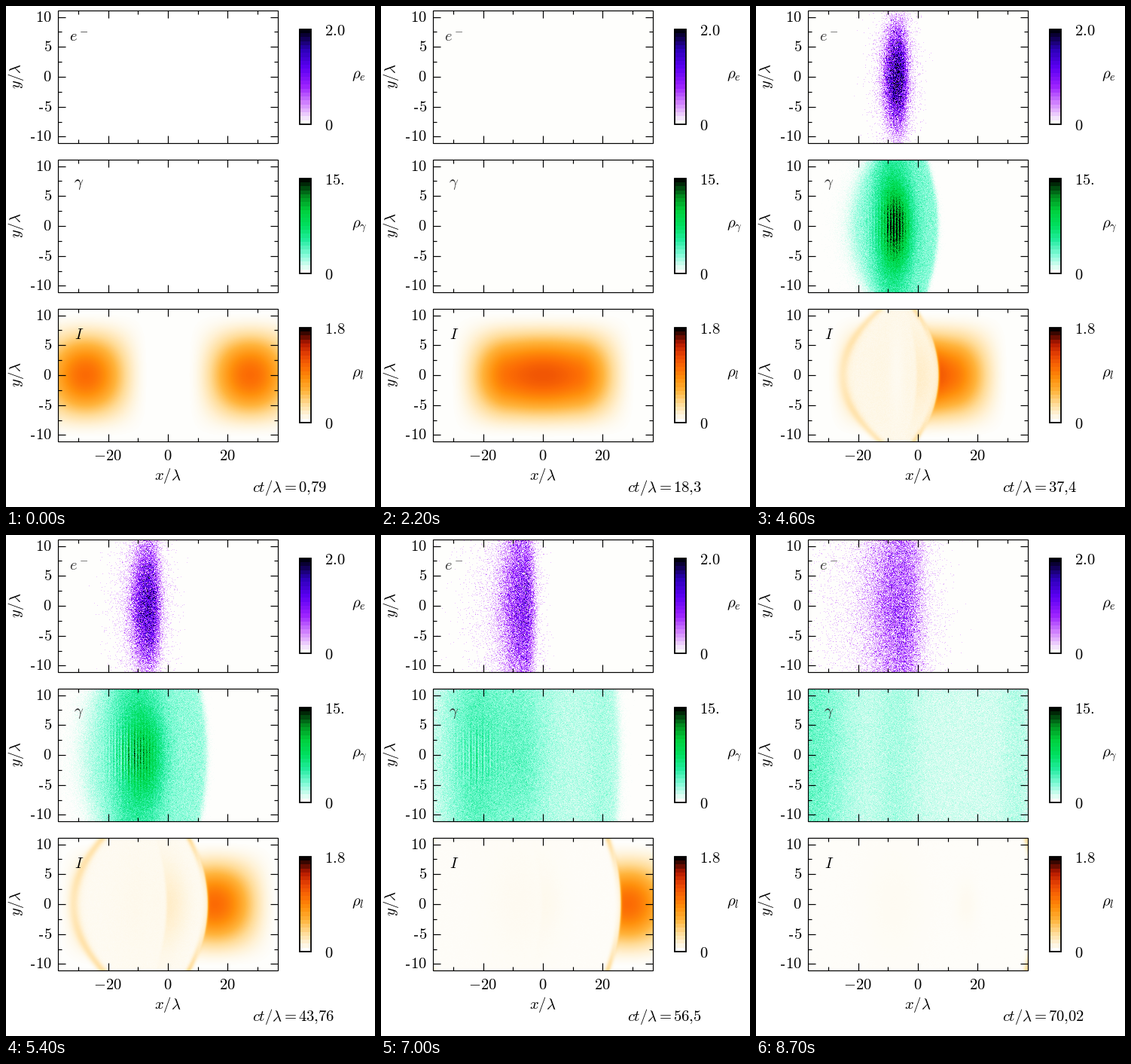
Recreate the animation shown at these times as a matplotlib script. Size 490 by 665 pixels, loop 8.8 s.

```python
import numpy as np
import matplotlib.pyplot as plt
from matplotlib.animation import FuncAnimation
from matplotlib.colors import LinearSegmentedColormap
from matplotlib.patches import Rectangle

W, H = 490, 665
FRAMES, STEP_MS = 88, 100
LEFT, RIGHT = 68.5, 360.5
TOPS = (5.5, 203.5, 401.5)
HEIGHT = 176
X0, XS = 214.6, 3.97      # pixel of x = 0, pixels per unit
YS = 7.94
PT = 0.72                 # points per pixel at 100 dpi
ONSET = 21.8              # time at which the cascade starts
BLANK = "#fefefc"
FADED = "#303030"

plt.rcParams["mathtext.fontset"] = "cm"


def ramp(name, *stops):
    return LinearSegmentedColormap.from_list(name, stops, N=256)


VIOLET = ramp("violet", (0, BLANK), (0.2, "#d488ff"), (0.4, "#9a20ff"),
              (0.6, "#5c00f4"), (0.8, "#2c00b8"), (1, "#000010"))
GREEN = ramp("green", (0, BLANK), (0.18, "#84fbd8"), (0.34, "#24eca0"),
             (0.5, "#00e060"), (0.67, "#00d03c"), (0.82, "#009020"), (1, "#000800"))
HEAT = ramp("heat", (0, BLANK), (0.06, "#fff4dc"), (0.18, "#ffdc98"),
            (0.32, "#ffb43c"), (0.46, "#ff900c"), (0.58, "#fc6c04"),
            (0.72, "#e84404"), (0.85, "#b41800"), (1, "#080000"))

cols = (np.arange(69, 361) + 0.5 - X0) / XS
rows = (HEIGHT / 2 - 0.5 - np.arange(HEIGHT)) / YS
X, Y = np.meshgrid(cols, rows)
Y2 = Y ** 2


def sig(v):
    return 1 / (1 + np.exp(-np.clip(v, -40, 40)))


def bell(v, width):
    return np.exp(-(v / width) ** 2)


def hann(v, reach):
    return np.cos(np.pi / 2 * np.clip(v / reach, -1, 1)) ** 2


def lopsided(center, left, right):
    d = X - center
    return d / np.where(d < 0, left, right)


def fronts(t, bend=1.0):
    """Left and right edges of the lens, which flatten as it grows."""
    a = 0.047 * bend * (43.76 / t) ** 1.6
    return 13.1 - t + 1.7 * a * Y2, t - 30.5 - a * Y2


def electrons(t, rng):
    age = max(t - ONSET, 0)
    rise = 1 - bell(age, 3)
    squeeze = 1 - 0.4 * bell(age - 34, 5)
    tall = 3 + 0.3 * age

    core = lopsided(0.05 * age - 7.3, 1.5 + 0.17 * age, (1.6 + 0.08 * age) * squeeze)
    dens = 2.3 * np.exp(-age / 30) * np.exp(-(core ** 2 + (Y / tall) ** 2) ** 1.3)

    young = bell(age, 15)
    comb = 1 + young * np.cos(2 * np.pi * X / 0.8)
    halo = lopsided(-6, 1 + 0.33 * age, (2 + 0.15 * age) * squeeze)
    dens += (0.1 + 0.35 * young) * bell(halo, 1) * bell(Y, tall) * comb
    return rng.poisson(dens * rise * 5) / 5 * rng.uniform(0.8, 1.2, X.shape)


def photons(t, rng):
    age = max(t - ONSET, 0)
    rise = 1 - bell(age, 3)
    dens = 4 * np.exp(-age / 35) + 0.8 * bell(X + 7, 7)
    dens += 15 * bell(age, 21) * bell(X + 7, 1 + 0.24 * age) * bell(Y, 2.5 + 0.26 * age)

    # a wave packet running off to the left
    c = -7 - age ** 2 / 80
    depth = 0.6 * bell(age - 26, 12) * bell(X - c, 7) * bell(Y, 4.5)
    hump = 2.5 * bell(X - c, 2 + 0.22 * age) * bell(Y, 8 + 0.5 * age)
    dens += hump * (1 + depth * np.cos(2 * np.pi * (X - c) / 1.8))
    dens *= 1 + depth * np.cos(2 * np.pi * X)

    left, right = fronts(t, 0.9 * np.exp(-age / 28))
    dens += 0.012 * age * bell(X - right + 6, 5)
    soft, edge = 0.3 + 0.08 * age, 0.1 + 0.017 * age
    dens *= sig((X - left - 1.5 * soft) / soft) * sig((right - X - edge) / edge)
    return rng.poisson(dens * rise * 7) / 7


def light(t, rng):
    pos, age = t - 28.2, max(t - ONSET, 0)
    field = 1.05 * (hann(X - pos, 21.5) + hann(X + pos, 21.5)) * hann(Y, 10.8)
    left, right = fronts(t)
    inside = sig((X - left) / 0.8) * sig((right - X) / 0.2) * min(age / 6, 1)

    hollow = 1 - 0.9 * bell(age - 8, 10) * bell(X + 7, 2.6) * bell(Y, 7.5)
    inner = (0.01 + 0.3 * np.exp(-age / 9)) * rng.uniform(0.75, 1.25, X.shape)
    inner = (inner + 0.022 * bell(X + 8, 10) * bell(Y, 9)) * hollow
    arc = lopsided(0.3 - 0.03 * Y2, 0.8, 6)
    inner += 0.12 * bell(age - 21, 10) * bell(arc, 1) * bell(Y, 7)
    inner += 0.03 * sig(age - 36) * bell(X - t + 54, 3.5) * bell(Y, 4)

    ring = 0.19 * (1 - bell(age, 14)) * sig((right - left) * 1.5)
    shell = bell(X - left + 0.8, 1.6) * (0.5 + Y2 / 110)
    shell += bell(X - right + 0.7, 1.0) * (0.25 + Y2 / 90)
    return field * (1 - inside) + inner * inside + ring * shell


fig = plt.figure(figsize=(W / 100, H / 100), dpi=100, facecolor="white")
ax = fig.add_axes([0, 0, 1, 1])
ax.set_axis_off()


def line(xs, ys, width=1.2):
    ax.plot(xs, ys, color="black", lw=width * PT, solid_capstyle="butt", zorder=4)


def label(x, y, text, ha="left", **kw):
    kw.setdefault("va", "baseline")
    return ax.text(x, y, f"${text}$", ha=ha, fontsize=20.7 * PT,
                   color="black", zorder=5, **kw)


def outline(x, y, w, h, width):
    ax.add_patch(Rectangle((x, y), w, h, fill=False, ec="black", lw=width * PT, zorder=4))


def y_number(y, value):
    digits = str(abs(value))
    label(60.8, y + 6.5, digits, "right")
    if value < 0:
        end = 60 - 10.3 * len(digits)
        line([end - 6.2, end - 1], [y + 2, y + 2], 1.5)


def panel(top, cmap, vmax, name, name_at, symbol, top_text):
    bottom, mid = top + HEIGHT, top + HEIGHT / 2
    img = ax.imshow(np.zeros(X.shape), cmap=cmap, vmin=0, vmax=vmax, aspect="auto",
                    extent=(69, 361, bottom + 0.5, top + 0.5),
                    interpolation="nearest", zorder=1)
    outline(LEFT, top, RIGHT - LEFT, HEIGHT, 1.2)

    for k in range(-4, 5):
        y = mid - round(k * 2.5 * YS)
        size = 5 if k % 2 else 10
        line([LEFT, LEFT + size], [y, y])
        line([RIGHT - size, RIGHT], [y, y])
        if k % 2 == 0:
            y_number(y, k * 5 // 2)
    for k in range(-3, 4):
        x = 214.5 + round(k * 10 * XS)
        size = 5 if k % 2 else 10
        line([x, x], [top, top + size])
        line([x, x], [bottom - size, bottom])

    label(14, mid, r"y/\lambda", "center", va="center", rotation=90)

    bar = np.linspace(1, 0, 24)[:, None]
    ax.imshow(bar, cmap=cmap, vmin=0, vmax=1, aspect="auto", interpolation="nearest",
              extent=(389, 405, top + 151.5, top + 25.5), zorder=1)
    outline(389.5, top + 25, 15.5, 126.5, 1.8)
    label(423, top + 33.5, top_text)
    label(423, top + 159.5, "0")
    label(459, top + 90.5, symbol)
    tag = label(name_at[0], top + name_at[1], name)
    return img, tag


e_img, e_tag = panel(TOPS[0], VIOLET, 2.0, "e^-", (84, 41.5), r"\rho_e", "2.0")
g_img, g_tag = panel(TOPS[1], GREEN, 15, r"\gamma", (90, 35.5), r"\rho_\gamma", "15.")
i_img, i_tag = panel(TOPS[2], HEAT, 1.8, "I", (91, 40.5), r"\rho_l", "1.8")

for value in (-20, 0, 20):
    label(X0 + value * XS, 603, str(value), "center")
label(X0, 629, r"x/\lambda", "center")
label(327, 645, r"ct/\lambda =")
clock = label(387.5, 645, "0")

ax.set_xlim(0, W)
ax.set_ylim(H, 0)


def clock_text(t):
    cut = np.floor(t * 100 + 1e-6) / 100
    return f"{cut:.2f}".rstrip("0").rstrip(".").replace(".", "{,}")


def draw(i):
    t = (i + 1) * 2.5 / np.pi
    rng = np.random.default_rng(100 + i)
    e_img.set_data(electrons(t, rng))
    g_img.set_data(photons(t, rng))
    i_img.set_data(light(t, rng))
    for img, tag, start in ((e_img, e_tag, 19), (g_img, g_tag, 1)):
        img.set_visible(i >= start)
        tag.set_color(FADED if i >= start else "black")
    clock.set_text(f"${clock_text(t)}$")
    return e_img, g_img, i_img, clock


anim = FuncAnimation(fig, draw, frames=FRAMES, interval=STEP_MS,
                     repeat=True, repeat_delay=0, blit=False)
plt.show()
```
